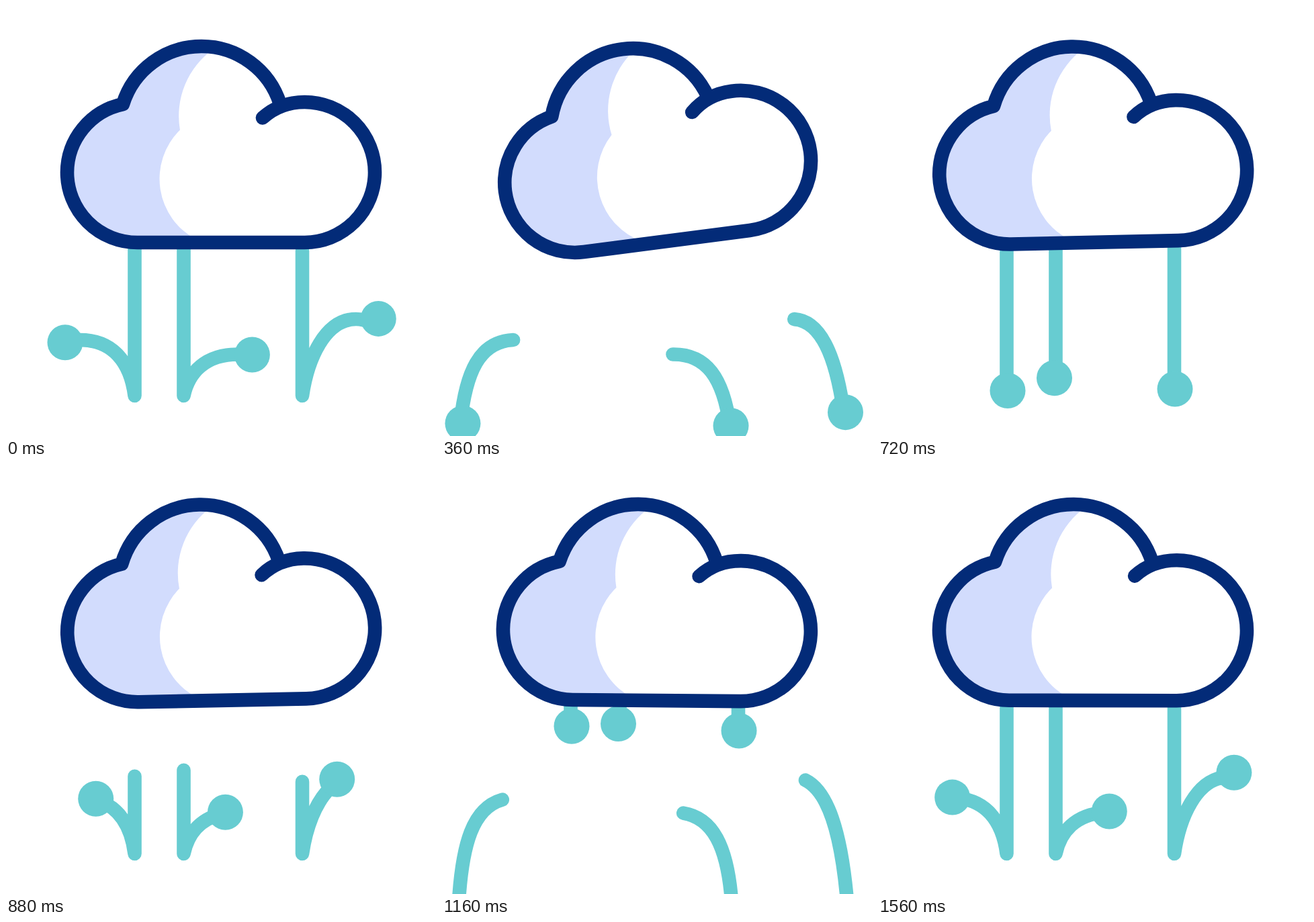
Animation, 640 px wide and 640 px high, one loop 1.6 s. Source, as an HTML page:

```html
<!DOCTYPE html>
<html lang="en">
<head>
<meta charset="utf-8">
<title>Cloud rain</title>
<style>
  html, body { margin: 0; width: 100%; height: 100%; overflow: hidden; background: #fff; }
  svg { display: block; width: 100vw; height: 100vh; }
  .line { fill: none; stroke: #67ccd1; stroke-width: 20.6; stroke-linecap: round; stroke-linejoin: round; }
  .dot { fill: #67ccd1; }
  .edge { fill: none; stroke: #032b78; stroke-width: 20.6; stroke-linecap: round; stroke-linejoin: round; }
</style>
</head>
<body>
<svg viewBox="0 0 640 640">
  <g id="rain"></g>
  <g id="cloud">
    <path fill="#fff" d="M195.5 352A104.5 104.5 0 0 1 91 247.5A104.5 104.5 0 0 1 174 146A122.6 122.6 0 0 1 408 146L444.5 143A104.5 104.5 0 0 1 444.5 352Z"/>
    <path fill="#d2dcfd" d="M309 64A122 122 0 0 0 259 184.5A102 102 0 0 0 284 348L195.5 352A104.5 104.5 0 0 1 91 247.5A104.5 104.5 0 0 1 174 146A122.6 122.6 0 0 1 309 64Z"/>
    <path class="edge" d="M408 146A122.6 122.6 0 0 0 174 146A104.5 104.5 0 0 0 91 247.5A104.5 104.5 0 0 0 195.5 352H444.5A104.5 104.5 0 0 0 444.5 143C420 143 399 151 382 166.5"/>
  </g>
</svg>
<script>
const LOOP = 1600;
const NS = 'http://www.w3.org/2000/svg';
const rain = document.getElementById('rain');
const cloud = document.getElementById('cloud');

// Each branch: path of the stroke, path of the dot, progress of the short drop at 600 and 880 ms, time its dot leaves
const branches = [
  { line: 'M191.5 310V580C185 529 158 497 110 497C50 497 31 555 25 650L22 700',
    ball: 'M193 310V575C185 530 160 496 115 496C60 496 31 548 31 614L30.5 700', mid: [0.288, 0.578], gone: 1100 },
  { line: 'M264.5 310V580C272 545 297 518.5 345 518.5C398 518.5 424 560 431 650L434 700',
    ball: 'M262.5 310V575C272 540 300 517 344 517C390 517 428 540 430 615V700', mid: [0.262, 0.585], gone: 1060 },
  { line: 'M441 310V580C449 525 475 466 521 466C565 466 592 525 603 650L606 690',
    ball: 'M442 310V575C450 525 478 459 521 459C572 459 600 490 600.5 607L601.5 690', mid: [0.241, 0.557], gone: 1010 }
];

// Progress along the path as [time, fraction] steps
const longHead = [[1058, 0], [1160, 0.125], [1560, 0.615], [1600, 0.652], [1760, 0.742], [1960, 0.875], [2080, 1]];
const longTail = [[1547, 0], [1760, 0.314], [1960, 0.624], [2170, 0.97], [2185, 1]];
const shortTail = [[710, 0], [880, 0.239], [1160, 0.65], [1403, 1]];

function at(steps, t) {
  if (t <= steps[0][0]) return steps[0][1];
  for (let i = 1; i < steps.length; i++) {
    const [t0, a] = steps[i - 1], [t1, b] = steps[i];
    if (t < t1) return a + (b - a) * (t - t0) / (t1 - t0);
  }
  return steps[steps.length - 1][1];
}

function add(tag, attrs) {
  const el = document.createElementNS(NS, tag);
  for (const k in attrs) el.setAttribute(k, attrs[k]);
  return rain.appendChild(el);
}

function makeDrop(branch, head, tail, gone, wrap) {
  const line = add('path', { class: 'line', d: branch.line });
  const dot = add('circle', { class: 'dot', r: 26.5 });
  const track = document.createElementNS(NS, 'path');
  track.setAttribute('d', branch.ball);
  const len = line.getTotalLength(), trackLen = track.getTotalLength();
  return now => {
    const t = wrap && now < 1000 ? now + LOOP : now;
    const h = at(head, t), s = at(tail, t);
    const live = h > 0 && s < h;
    line.style.display = live ? '' : 'none';
    dot.style.display = live && t < gone ? '' : 'none';
    if (!live) return;
    line.setAttribute('stroke-dasharray', `${(h - s) * len} 2000`);
    line.setAttribute('stroke-dashoffset', -s * len);
    const p = track.getPointAtLength(h * trackLen);
    dot.setAttribute('cx', p.x);
    dot.setAttribute('cy', p.y);
  };
}

const drops = branches.flatMap(b => [
  makeDrop(b, longHead, longTail, 2080, true),
  makeDrop(b, [[385, 0], [600, b.mid[0]], [880, b.mid[1]], [1080, 0.86], [1160, 0.95], [1200, 1]], shortTail, b.gone, false)
]);

// Lean back, snap over, then a damped swing
function tilt(t) {
  if (t < 400) return -7.5 * Math.sin(Math.PI / 2 * t / 400);
  if (t < 535) return -1.55 - 5.95 * Math.cos(Math.PI * (t - 400) / 135);
  const s = t - 535;
  return 4.4 * Math.exp(-s / 330) * Math.cos(2 * Math.PI * s / 560);
}

function draw() {
  const t = performance.now() % LOOP;
  drops.forEach(drop => drop(t));
  cloud.setAttribute('transform', `rotate(${tilt(t)} 312 238)`);
  requestAnimationFrame(draw);
}
draw();
</script>
</body>
</html>
```
